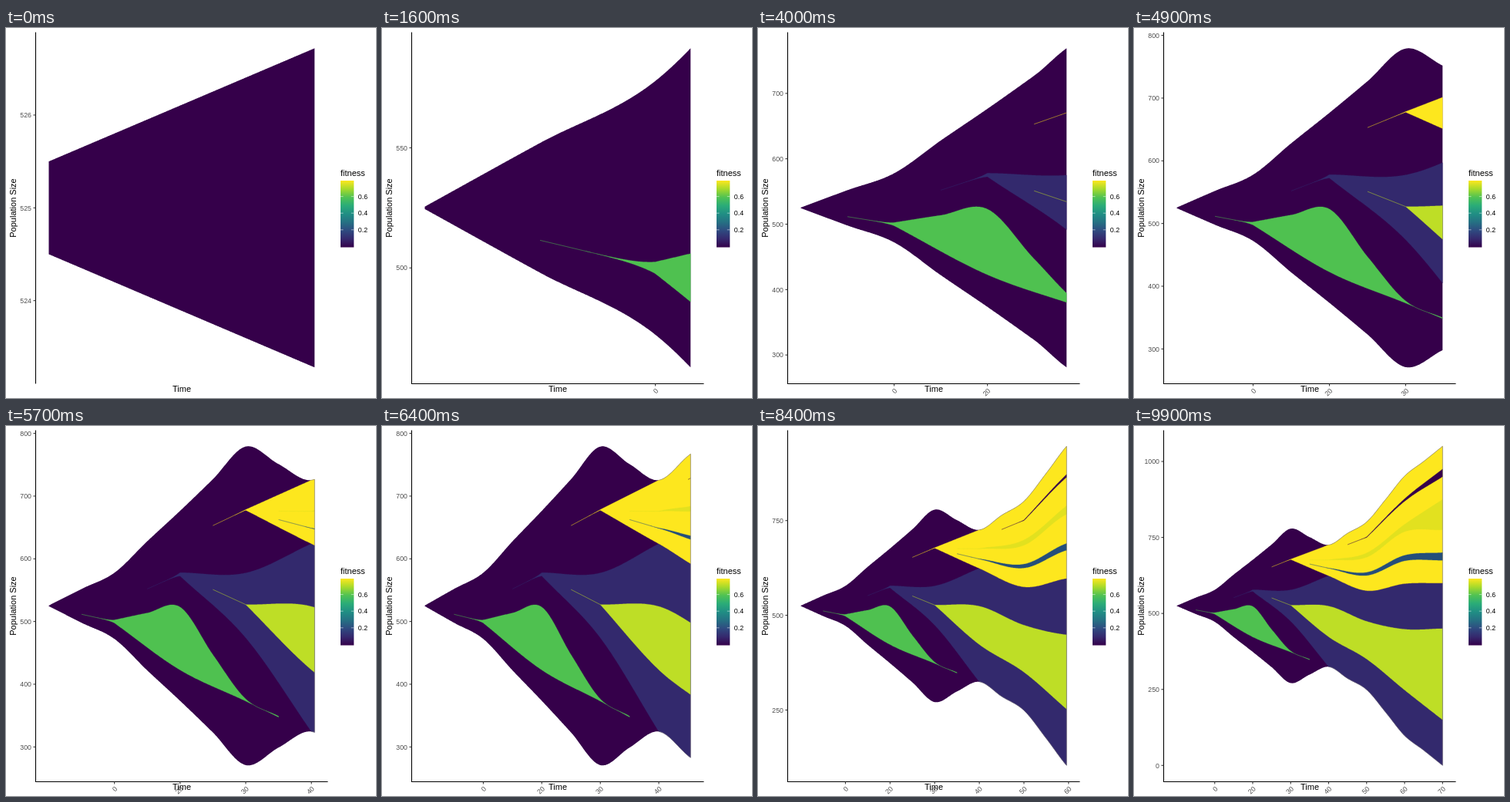
Recreate the animation shown at these times as an HTML page with a canvas. Size 480x480 px, loop 10000 ms.

```html
<!DOCTYPE html>
<html>
<head>
<meta charset="utf-8">
<style>
html, body { margin: 0; width: 100%; height: 100%; overflow: hidden; background: #fff; }
canvas { display: block; }
</style>
</head>
<body>
<canvas id="stage" width="480" height="480"></canvas>
<script>
const ctx = document.getElementById('stage').getContext('2d');
const FONT = '"Liberation Sans", Arial, sans-serif';
const LEFT = 55.5, RIGHT = 400.3, MID = 233.3, HALF = 207, CENTER = 525;
const PURPLE = '#35004a', INDIGO = '#33296d', GREEN = '#4fc150', LIME = '#bede26';
const YELLOW = '#fde71e', BLUE = '#254e7a', PALE = '#e2e11f';

// Smooth curve through evenly spaced key values
function curve(start, p, gap = 10) {
  const at = i => i < 0 ? 2 * p[0] - p[1]
    : i < p.length ? p[i] : 2 * p[p.length - 1] - p[p.length - 2];
  return t => {
    const s = (t - start) / gap;
    const i = Math.max(0, Math.min(p.length - 2, Math.floor(s)));
    const u = Math.min(1, Math.max(0, s - i));
    const a = at(i), b = at(i + 1);
    const m = (b - at(i - 1)) / 2, n = (at(i + 2) - a) / 2;
    return a + u * (m + u * (3 * (b - a) - 2 * m - n + u * (m + n - 2 * (b - a))));
  };
}

const half = curve(0, [.5, 27, 52.8, 103, 151.5, 202, 254, 226, 200.5, 239, 276, 350, 427, 475, 525], 5);
const upper = t => CENTER + half(t), lower = t => CENTER - half(t);
const until40 = (f, g) => t => t < 40 ? f(t) : g(t);
const seam = curve(30, [677.5, 624, 575, 598, 600]);

// A newborn clone is a hairline for 5 time units, then opens into its band
function clone(color, birth, value, hi, lo, end = 70) {
  const open = birth + 5, mid = (hi(open) + lo(open)) / 2;
  const edge = f => t => {
    const u = (t - birth) / 5;
    return u < 1 ? value + (mid - value) * u + (f(open) - mid) * u ** 6 : f(t);
  };
  return { color, birth, end, hi: edge(hi), lo: edge(lo) };
}

const bands = [
  { color: PURPLE, birth: 0, end: 70, hi: upper, lo: lower },
  clone(GREEN, 5, 511.5,
    curve(10, [502.5, 513.6, 523, 447, 376.5, 349], 5), curve(10, [497.6, 422.7, 373, 322]), 35),
  clone(INDIGO, 15, 552,
    until40(curve(20, [578, 577.5, 624]), seam), until40(curve(20, [572.6, 474, 324.5]), lower)),
  clone(LIME, 25, 551, curve(30, [527, 524, 474, 448, 450]), curve(30, [527, 423, 350, 248, 150])),
  clone(YELLOW, 25, 653, until40(curve(30, [678.5, 725.5]), upper), seam),
  clone(BLUE, 35, 662.5, curve(40, [649, 635, 691, 700]), curve(40, [648.5, 625, 673, 675])),
  clone(PALE, 35, 676, curve(40, [676, 699, 793, 875]), curve(40, [675.5, 685, 769, 775])),
  clone(PURPLE, 45, 726.5, curve(50, [751.5, 877, 975]), curve(50, [750, 869, 950]))
];

// Extended Wilkinson axis breaks
function axisBreaks(min, max) {
  const range = max - min;
  let best = { score: -9 };
  for (let j = 1; j <= 2; j++) [1, 5, 2, 2.5, 4, 3].forEach((q, rank) => {
    for (let k = 2; k <= 10; k++) {
      const z0 = Math.ceil(Math.log10(range / (k + 1) / j / q));
      for (let z = z0; z < z0 + 2; z++) {
        const step = j * q * 10 ** z;
        const last = Math.ceil(min / step) * j;
        for (let s = (Math.floor(max / step) - k + 1) * j; s <= last; s++) {
          const lo = s * step / j, hi = lo + step * (k - 1);
          const zero = s % j === 0 && lo <= 0 && hi >= 0 ? 1 : 0;
          const simple = 1 - rank / 5 - j + zero;
          const cover = 1 - .5 * ((max - hi) ** 2 + (min - lo) ** 2) / (.1 * range) ** 2;
          const r = (k - 1) / (hi - lo) * (Math.max(hi, max) - Math.min(lo, min)) / 4;
          const score = .25 * simple + .2 * cover + .5 * (2 - Math.max(r, 1 / r)) + .05;
          if (score > best.score + 1e-9) best = { score, lo, step, k };
        }
      }
    }
  });
  const whole = Math.abs(best.step - Math.round(best.step)) < 1e-6;
  return Array.from({ length: best.k }, (_, i) => best.lo + i * best.step)
    .filter(v => v >= min && v <= max)
    .map(v => [v, v.toFixed(whole ? 0 : 1)]);
}

function line(x1, y1, x2, y2, color = '#000', width = 1.07) {
  ctx.strokeStyle = color;
  ctx.lineWidth = width;
  ctx.beginPath();
  ctx.moveTo(x1, y1);
  ctx.lineTo(x2, y2);
  ctx.stroke();
}

function text(str, x, y, size, align = 'left', color = '#000', angle = 0) {
  ctx.save();
  ctx.translate(x, y);
  ctx.rotate(angle);
  ctx.font = size + 'px ' + FONT;
  ctx.fillStyle = color;
  ctx.textAlign = align;
  ctx.fillText(str, 0, 0);
  ctx.restore();
}

function legend() {
  text('fitness', 434, 192, 11);
  const g = ctx.createLinearGradient(0, 284.5, 0, 198);
  [PURPLE, '#35286d', '#2f4a80', '#257083', '#208e84', '#2aac78', '#50c253', '#a7da2b', YELLOW]
    .forEach((c, i) => g.addColorStop(i / 8, c));
  ctx.fillStyle = g;
  ctx.fillRect(434, 198, 17.3, 86.5);
  for (const v of [.2, .4, .6]) {
    const y = 283.4 - v * 108;
    line(434, y, 437.5, y, '#fff', .5);
    line(447.8, y, 451.3, y, '#fff', .5);
    text(v.toFixed(1), 456.8, y + 3.2, 8.8);
  }
}

function draw(step) {
  const now = Math.min(70, .23 + .7062 * step);
  let H = 0;
  for (let i = 0; i <= 400; i++) H = Math.max(H, half(now * i / 400));
  const X = t => LEFT + (RIGHT - LEFT) * t / now;
  const Y = v => MID - (v - CENTER) * HALF / H;
  const trace = (f, from, to) => {
    const n = Math.max(2, Math.ceil(Math.abs(X(to) - X(from))));
    for (let i = 0; i <= n; i++) {
      const t = from + (to - from) * i / n;
      ctx.lineTo(X(t), Y(f(t)));
    }
  };

  ctx.fillStyle = '#fff';
  ctx.fillRect(0, 0, 480, 480);

  for (const b of bands) {
    if (b.birth >= now) continue;
    const end = Math.min(now, b.end);
    ctx.beginPath();
    trace(b.hi, b.birth, end);
    trace(t => Math.min(b.lo(t), b.hi(t)), end, b.birth);
    ctx.closePath();
    ctx.fillStyle = ctx.strokeStyle = b.color;
    ctx.fill();
    if (b.birth) {
      ctx.lineWidth = .3;
      ctx.stroke();
    }
  }

  // The vanished founder leaves a hairline around the others
  if (now > 40) {
    ctx.beginPath();
    trace(upper, 40, now);
    trace(lower, now, 40);
    ctx.strokeStyle = '#888';
    ctx.lineWidth = .6;
    ctx.stroke();
  }

  line(38.5, 5.5, 38.5, 461.5);
  for (const [v, label] of axisBreaks(CENTER - 1.1 * H, CENTER + 1.1 * H)) {
    const y = Y(v);
    line(35.5, y, 38.5, y, '#333');
    text(label, 33, y + 3.2, 8.8, 'right', '#4d4d4d');
  }

  if (now * 1.05 >= 10) line(38, 461.5, 417.5, 461.5);
  for (let t = 10; t <= Math.min(70, now * 1.05); t += 10) {
    line(X(t), 461.5, X(t), 464.5, '#333');
    text(t === 10 ? '0' : t, X(t) + 4.4, 471.2, 8.8, 'right', '#4d4d4d', -Math.PI / 4);
  }

  text('Time', 228, 472, 11, 'center');
  text('Population Size', 13, 233.5, 11, 'center', '#000', -Math.PI / 2);
  legend();
}

function tick() {
  draw(Math.floor(performance.now() / 100) % 100);
  requestAnimationFrame(tick);
}
tick();
</script>
</body>
</html>
```
